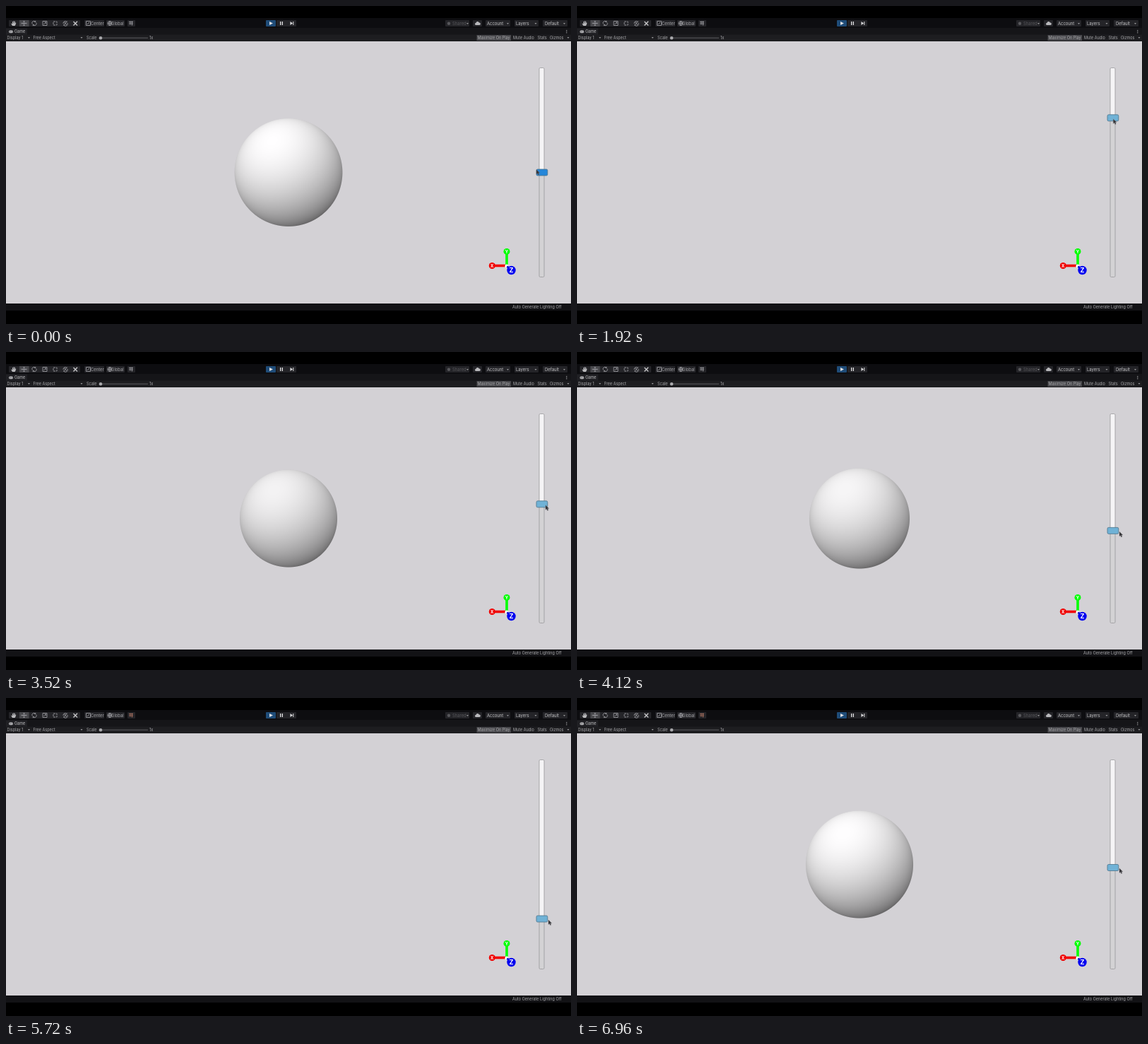
An HTML page with a canvas that plays this animation: 800x450 px, repeating every 7000 ms.

```html
<!DOCTYPE html>
<html lang="en">
<head>
<meta charset="utf-8">
<title>Slicing a four-dimensional sphere</title>
<style>
  html, body { margin: 0; width: 100%; height: 100%; overflow: hidden; background: #000; }
  svg { display: block; width: 800px; height: 450px; }
  canvas { position: absolute; left: 320px; top: 155px; }
  text { font: 5.5px Inter, sans-serif; fill: #a9a9ac; }
  .tool { font-size: 5.9px; }
  .axis { font-weight: 700; fill: #fff; text-anchor: middle; }
  .icon { fill: none; stroke: #99999d; stroke-width: .9; }
  .solid { fill: #b9b9bc; }
  .button { fill: #242428; }
</style>
</head>
<body>
<svg viewBox="0 0 800 450">
  <rect y="17" width="800" height="15" fill="#0d0d10"/>
  <rect y="31" width="800" height="10" fill="#151518"/>
  <rect y="31.5" width="30" height="9.5" fill="#202024"/>
  <rect y="40.5" width="800" height="9.5" fill="#1d1d20"/>
  <rect y="50" width="800" height="371" fill="#d3d1d5"/>
  <rect y="421" width="800" height="10" fill="#121215"/>

  <!-- toolbar -->
  <g class="button">
    <rect x="4" y="20" width="101" height="9" rx="1"/>
    <rect x="111" y="20" width="28" height="9" rx="1"/>
    <rect x="142" y="20" width="26" height="9" rx="1"/>
    <rect x="172" y="20" width="11" height="9" rx="1"/>
    <rect x="383" y="20" width="28" height="9" rx="1"/>
    <rect x="622" y="20" width="34" height="9" rx="1"/>
    <rect x="661" y="20" width="13" height="9" rx="1"/>
    <rect x="679" y="20" width="35" height="9" rx="1"/>
    <rect x="720" y="20" width="34" height="9" rx="1"/>
    <rect x="760" y="20" width="35" height="9" rx="1"/>
  </g>
  <rect x="19" y="20" width="13.5" height="9" fill="#48484c"/>
  <rect x="368" y="20" width="14" height="9" rx="1" fill="#1f4c78"/>
  <path class="solid" d="M9 28l-1.8-3 .9-.4 1 1V22h1v2.300h.4v-3h1v3h.4v-2.500h1V25l.5-1.500 1 .3-1 3-.8 1.200z"/>
  <g class="icon">
    <path d="M22 24.500h7M25.500 21v7M23 23.500l-1 1 1 1M28 23.500l1 1-1 1M24.500 22l1-1 1 1M24.500 27l1 1 1-1"/>
    <path d="M37.300 25.500a2.700 2.700 0 0 1 4.500-3M42.700 23.500a2.700 2.700 0 0 1-4.500 3M41.800 20.800v1.700h-1.700M38.200 28.200v-1.700h1.700"/>
    <path d="M52 21.500h6v6h-6zM53.500 26l3-3M54.700 23h1.800v1.800"/>
    <path d="M67 22h5v5h-5z" stroke-dasharray="3 1"/>
    <path d="M81 25a3 3 0 0 1 5.500-2M87 24a3 3 0 0 1-5.500 2.500M81.500 27.500l5-6M82 22l4 5"/>
    <path d="M95.500 22l5.500 5.500M101 21.700l-5.500 5.700" stroke="#c4c4c6" stroke-width="1.400"/>
    <path d="M113.500 21.500h6v6h-6zM115 26l3-3"/>
    <circle cx="147" cy="24.500" r="3"/>
    <path d="M144 24.500h6M147 21.500q-2.500 3 0 6M147 21.500q2.500 3 0 6"/>
    <path id="snap" d="M174 22.500h6M174 25h6M176 21.500v5M178.500 21.500v6"/>
  </g>
  <path fill="#e0e0e2" d="M373 22l5 2.500-5 2.500zM388 22h1.300v5H388zM390.700 22h1.300v5h-1.300zM402.500 22l3.500 2.500-3.500 2.500zM406.300 22h1v5h-1z"/>
  <circle cx="627" cy="24.800" r="2.200" fill="#57575b"/>
  <path class="solid" d="M665.500 27a1.500 1.500 0 0 1-.2-3 2.400 2.400 0 0 1 4.600-.6 1.800 1.800 0 0 1 .3 3.600z"/>
  <path class="solid" d="M652 24.200h3l-1.500 1.500zM709 24.200h3l-1.500 1.500zM748.500 24.200h3l-1.500 1.500zM789 24.200h3l-1.500 1.500zM31 44.300h3l-1.500 1.500zM105.500 44.300h3l-1.500 1.500zM794.500 44.300h3l-1.500 1.500z"/>
  <text class="tool" x="120" y="26.700">Center</text>
  <text class="tool" x="149" y="26.700">Global</text>
  <text class="tool" x="632" y="26.700" style="fill:#57575b">Shared</text>
  <text class="tool" x="681" y="26.700" style="fill:#c4c4c6">Account</text>
  <text class="tool" x="722" y="26.700" style="fill:#c4c4c6">Layers</text>
  <text class="tool" x="763" y="26.700" style="fill:#c4c4c6">Default</text>

  <!-- view header -->
  <rect x="4" y="34.600" width="6" height="3.600" rx="1.800" class="solid"/>
  <path d="M5 36.400h1.600M8 36.400h1" stroke="#202024" stroke-width=".7"/>
  <path class="solid" d="M793.300 34h1v1h-1zM793.300 35.800h1v1h-1zM793.300 37.600h1v1h-1z"/>
  <rect x="666.500" y="41" width="48.500" height="8" fill="#48484c"/>
  <path d="M134 45.200h67" stroke="#5d5d61"/>
  <circle cx="134" cy="45.200" r="2.300" fill="#a9a9ac"/>
  <text x="12" y="38.400" style="fill:#c4c4c6">Game</text>
  <text x="1.500" y="47.100">Display 1</text>
  <text x="38.500" y="47.100">Free Aspect</text>
  <text x="114" y="47.100">Scale</text>
  <text x="203" y="47.100">1x</text>
  <text x="667.500" y="47.100">Maximize On Play</text>
  <text x="718" y="47.100">Mute Audio</text>
  <text x="752.500" y="47.100">Stats</text>
  <text x="770" y="47.100">Gizmos</text>
  <text x="717" y="428.200">Auto Generate Lighting Off</text>

  <!-- axes -->
  <g stroke-width="3.600">
    <path d="M709 347.500V367" stroke="#0f0"/>
    <path d="M688 367.500H707" stroke="#f00000"/>
    <circle cx="709" cy="368" r="2.600" fill="#fff"/>
    <path d="M709.500 368.500l6 5.500" stroke="#0000c8" stroke-width="3"/>
  </g>
  <circle cx="709" cy="347.400" r="4.500" fill="#0f0"/>
  <circle cx="688.300" cy="367.500" r="4.500" fill="#f00000"/>
  <circle cx="715.500" cy="374" r="6.200" fill="#0000f0"/>
  <text class="axis" x="709" y="349.600" style="font-size:6px">Y</text>
  <text class="axis" x="688.300" y="369.700" style="font-size:6px">X</text>
  <text class="axis" x="715.500" y="377.200" style="font-size:9px">Z</text>

  <!-- slider -->
  <rect x="755" y="87.500" width="7" height="296" rx="1.500" fill="#d3d2d4"/>
  <rect id="fill" x="755" y="87.500" width="7" height="148" rx="1.500" fill="#f5f4f6"/>
  <rect x="755" y="87.500" width="7" height="296" rx="1.500" fill="none" stroke="#99989b" stroke-width=".8"/>
  <rect id="handle" x="751" y="-4.500" width="15.800" height="9" rx="1.700" stroke="#4b7288" stroke-width=".8"/>
  <path id="cursor" d="M0 0v6.500l1.500-1.300 1.100 2.400 1.300-.6-1.100-2.300h2z" fill="#333236" stroke="#77767a" stroke-width=".4"/>
</svg>
<canvas id="ball" width="160" height="160"></canvas>
<script>
const LOOP = 7000, STEP = 40, MIDDLE = 235.5, REACH = 48.2;
const FOCAL = 321, DISTANCE_SQ = 18.66;
const LIGHT = [-.3, -.59, .75];

// time, handle y, cursor x, cursor y relative to the handle
const keys = [
  [0, 235.5, 751, -4], [360, 235.5, 763, 0], [720, 235.5, 761, 1.5],
  [1240, 197.3, 760, 1.3], [2240, 140, 759, 1.7], [2400, 140, 759, 1.7],
  [2840, 171, 759, 1.7], [3120, 191, 760, 1.5], [3520, 215.3, 764, 1.5],
  [3840, 235, 768, 1.5], [4600, 283.4, 768, 1.5], [5240, 327, 768, 1.5],
  [5440, 327, 768, 1.5], [6000, 298, 768, 1.5], [6440, 270.1, 768, 1],
  [6720, 250.8, 769, 1], [6960, 240, 768, 1]
];

const el = id => document.getElementById(id);
const clamp = (v, lo, hi) => Math.min(hi, Math.max(lo, v));
const mix = (a, b, k) => a + (b - a) * k;
const ctx = el('ball').getContext('2d');
const image = ctx.createImageData(160, 160);

function pose(t) {
  const i = keys.findIndex(k => k[0] >= t);
  if (i < 1) return keys[0];
  const a = keys[i - 1], b = keys[i];
  return a.map((v, n) => mix(v, b[n], (t - a[0]) / (b[0] - a[0])));
}

// The visible ball is the 3D slice of a 4D sphere at depth w.
function drawBall(w) {
  const slice = Math.sqrt(Math.max(0, 1 - w * w));
  const radius = FOCAL * slice / Math.sqrt(DISTANCE_SQ - slice * slice);
  image.data.fill(0);
  if (radius > 0) for (let py = 0; py < 160; py++) {
    for (let px = 0; px < 160; px++) {
      const x = (px - 79.5) / radius, y = (py - 80) / radius;
      const d = Math.hypot(x, y), alpha = clamp((1 - d) * radius + .5, 0, 1);
      if (!alpha) continue;
      const z = Math.sqrt(Math.max(0, 1 - d * d));
      const lit = x * LIGHT[0] + y * LIGHT[1] + z * LIGHT[2];
      const shade = 127 + slice * (30 + 98 * lit);
      image.data.set([shade, shade - 1, shade, alpha * 255], (py * 160 + px) * 4);
    }
  }
  ctx.putImageData(image, 0, 0);
}

function draw(now) {
  const t = Math.floor(now % LOOP / STEP) * STEP;
  const [, y, cx, dy] = pose(t);
  const press = clamp((t - 360) / 100, 0, 1);
  drawBall((y - MIDDLE) / REACH);
  el('fill').setAttribute('height', y - 87.5);
  el('handle').setAttribute('transform', `translate(0 ${y})`);
  el('handle').setAttribute('fill', `rgb(${mix(36, 112, press)},${mix(134, 178, press)},${mix(217, 214, press)})`);
  el('cursor').setAttribute('transform', `translate(${cx} ${y + dy})`);
  el('snap').style.stroke = t >= 5640 ? '#a8705f' : '';
  requestAnimationFrame(() => draw(performance.now()));
}
draw(performance.now());
</script>
</body>
</html>
```
